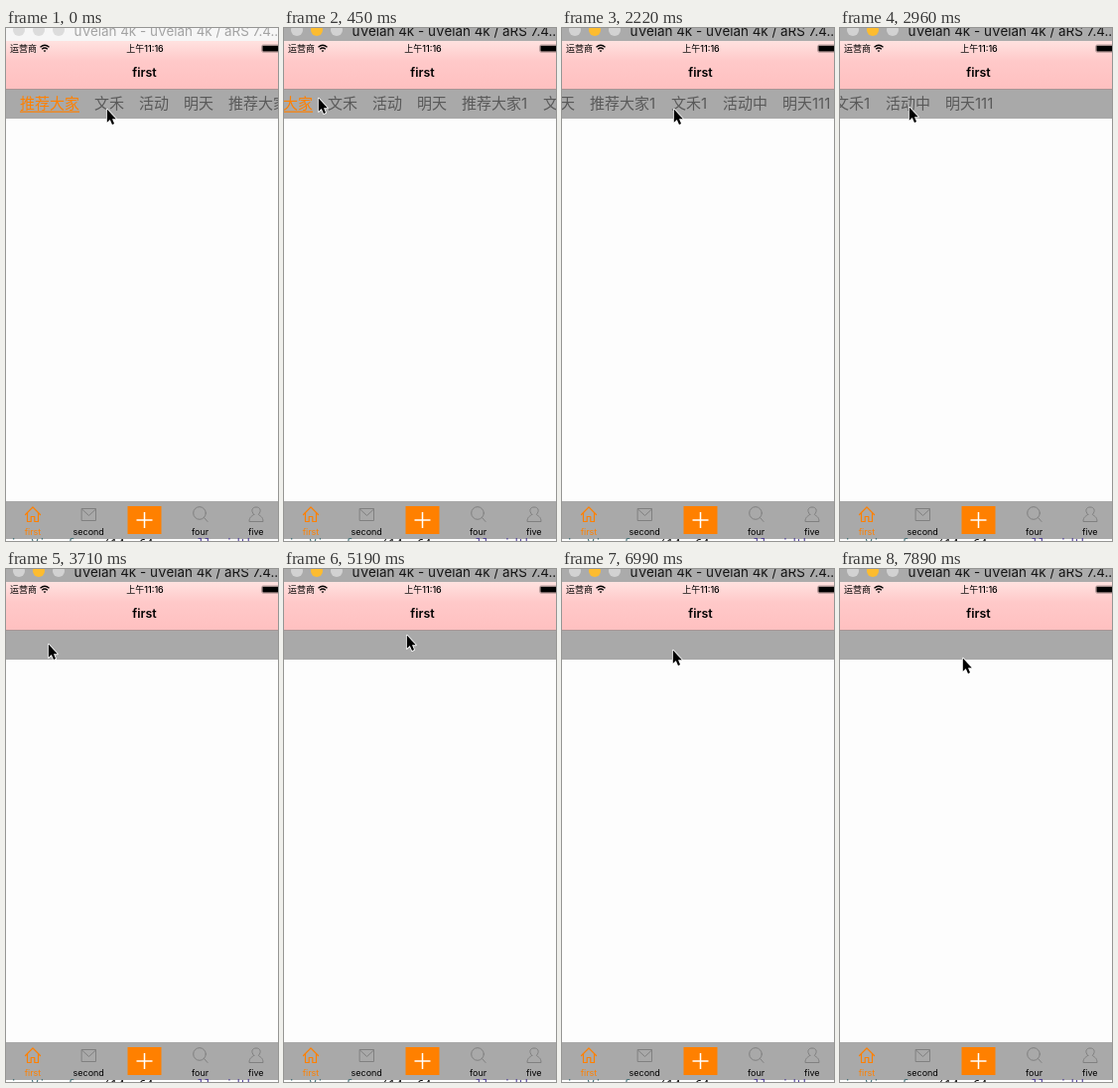
Recreate the animation shown at these times as an HTML page. Size 274 px wide and 515 px high, loop 8000 ms.

```html
<!DOCTYPE html>
<html lang="zh">
<head>
<meta charset="utf-8">
<title>Scrolling tabs</title>
<style>
html, body { margin: 0; width: 100%; height: 100%; overflow: hidden; background: #fff; }
svg { display: block; width: 274px; height: 515px; }
text { font-family: Inter, "Noto Sans CJK SC", "Noto Sans CJK", sans-serif; white-space: pre; }
.mid { text-anchor: middle; }
#tabs text { font-size: 15px; fill: #595959; }
#tabs .on { fill: #ff8000; }
.label { font-size: 9px; text-anchor: middle; }
.icon { fill: none; stroke: #808080; stroke-width: 1; stroke-linejoin: round; stroke-linecap: round; }
.code { font: 12px "Noto Sans Mono", monospace; }
</style>
</head>
<body>
<svg viewBox="0 0 274 515">
  <defs>
    <linearGradient id="pink" x1="0" y1="0" x2="0" y2="1">
      <stop offset="0" stop-color="#ffe2e0"/>
      <stop offset=".42" stop-color="#ffc9c9"/>
      <stop offset="1" stop-color="#ffc0c0"/>
    </linearGradient>
    <clipPath id="strip"><rect y="62" width="274" height="29"/></clipPath>
  </defs>

  <rect width="274" height="515" fill="#fdfdfd"/>

  <!-- window title -->
  <rect id="bar" width="274" height="13"/>
  <g id="lights">
    <circle cx="13" cy="2" r="6"/>
    <circle id="yellow" cx="33" cy="2" r="6"/>
    <circle cx="53" cy="2" r="6"/>
  </g>
  <text id="title" x="68.5" y="7.5" font-size="13.4">uVelan 4k - uVelan 4k / aRS 7.4...</text>

  <!-- status and navigation -->
  <rect y="13" width="274" height="48" fill="url(#pink)"/>
  <rect y="61" width="274" height="1" fill="#a99595"/>
  <text x="4" y="24" font-size="9">运营商</text>
  <g fill="none" stroke="#000" stroke-width="1.3">
    <path d="M34.5 19.3Q39 15.3 43.5 19.3M36.2 21.2Q39 18.8 41.8 21.2"/>
    <path d="M39 24.3L37.7 22.8Q39 21.8 40.3 22.8Z" fill="#000" stroke="none"/>
  </g>
  <text class="mid" x="140" y="24" font-size="9" font-weight="500">上午11:16</text>
  <rect x="257.6" y="17" width="20" height="7.2" rx="1.6" fill="none" stroke="#000" stroke-opacity=".5" stroke-width=".6"/>
  <rect x="258.4" y="17.8" width="20" height="5.6" rx=".8"/>
  <text class="mid" x="139.5" y="49" font-size="12.5" font-weight="600">first</text>

  <!-- scrolling strip -->
  <rect y="62" width="274" height="29" fill="#a9a9a9"/>
  <g clip-path="url(#strip)"><g id="tabs">
    <rect x="14" y="83.5" width="60" height="1.2" fill="#ff8000"/>
  </g></g>

  <!-- bottom bar -->
  <rect y="475" width="274" height="38" fill="#a9a9a9"/>
  <g class="icon">
    <path d="M19.5 488.5L27 481L34.5 488.5M21.5 487V495.5H25.2V490.5H28.8V495.5H32.5V487" stroke="#ff8000" stroke-width="1.2"/>
    <path d="M76.5 482.5H90.5V494.5H76.5ZM76.5 483L83.5 489.5L90.5 483"/>
    <circle cx="195" cy="487" r="6.3"/>
    <path d="M199.6 491.6L203 495.5"/>
    <path d="M249.7 488.4C246.2 484.5 248 481 252 481S257.8 484.5 254.3 488.4C256 490.2 259 490.5 259 495.5H245C245 490.5 248 490.2 249.7 488.4Z"/>
  </g>
  <rect x="122.5" y="480" width="34" height="28" fill="#ff8000"/>
  <path d="M131.5 494H147.5M139.5 486V502" stroke="#fff" stroke-width="1.5"/>
  <g id="labels"></g>
  <text class="code" x="4" y="522" fill="#3e6d74">imgView.frame</text>
  <text class="code" x="98" y="522">(14, 64,</text>
  <text class="code" x="178" y="522" fill="#4b3a96">cell.width</text>

  <path id="cursor" d="M1.8 1.6V14.8L4.8 12.1L7 17L9 16.1L7 11.3H10.8Z" stroke="#fff" stroke-width="1.7" paint-order="stroke" stroke-linejoin="round"/>
</svg>
<script>
const LOOP = 8000, STEP = 148.5;
const $ = id => document.getElementById(id);

function addText(parent, str, x, y, cls) {
  const el = document.createElementNS("http://www.w3.org/2000/svg", "text");
  el.textContent = str;
  el.setAttribute("x", x);
  el.setAttribute("y", y);
  el.setAttribute("class", cls);
  parent.append(el);
}

// each tab starts one gap after the one before; digits are narrower
let left = 14;
for (const name of "推荐大家 文禾 活动 明天 推荐大家1 文禾1 活动中 明天111".split(" ")) {
  addText($("tabs"), name, left, 81.3, left === 14 ? "on" : "");
  for (const ch of name) left += ch === "1" ? 7 : 15;
  left += 15;
}

["first", "second", "", "four", "five"].forEach((name, i) => {
  addText($("labels"), name, 27 + i * 56.2, 509, "label");
});
$("labels").firstChild.style.fill = "#ff8000";

// strokes: first step, last step, where the stroke ends
const pointer = [
  [0, 0, 100, 80], [1, 3, 33, 69], [5, 8, 96, 71], [9, 10, 36, 73],
  [10, 14, 137, 82], [14, 17, 38, 76], [19, 22, 153, 85], [22, 25, 41, 74],
  [30, 31, 25, 78], [31, 33, 36, 76], [34, 35, 122, 65], [35, 37, 183, 66],
  [38, 40, 122, 78], [41, 43, 251, 79], [44, 47, 110, 80],
  [48, 50, 254, 69], [51, 53, 122, 88]
];
const scroll = [[0, 0, 0], [1, 3, 45], [9, 10, 97], [10, 14, 155], [14, 17, 312], [22, 25, 500]];

const smooth = p => p * p * (3 - 2 * p);

// position after n steps, eased along each stroke in turn
function follow(strokes, n) {
  let pos = strokes[0].slice(2);
  for (const [from, to, ...end] of strokes) {
    if (n <= from) break;
    const p = smooth(Math.min(1, (n - from) / (to - from)));
    pos = pos.map((v, i) => v + (end[i] - v) * p);
  }
  return pos;
}

function draw(t) {
  const n = Math.floor((t + 10) / STEP);
  const active = n >= 2;
  const [x, y] = follow(pointer, n).map(Math.round);
  const [shift] = follow(scroll, n).map(Math.round);
  $("cursor").setAttribute("transform", `translate(${x} ${y})`);
  $("cursor").setAttribute("visibility", n >= 28 && n < 31 ? "hidden" : "visible");
  $("tabs").setAttribute("transform", `translate(${-shift} 0)`);
  $("bar").setAttribute("fill", active ? "#ababab" : "#f6f6f6");
  $("lights").setAttribute("fill", active ? "#d2d2d2" : "#dcdcdc");
  $("yellow").setAttribute("fill", active ? "#fdbc2f" : "#dcdcdc");
  $("title").setAttribute("fill", active ? "#151515" : "#a3a3a3");
}

const start = performance.now();
function tick(now) {
  draw(Math.max(0, now - start) % LOOP);
  requestAnimationFrame(tick);
}
draw(0);
requestAnimationFrame(tick);
</script>
</body>
</html>
```
